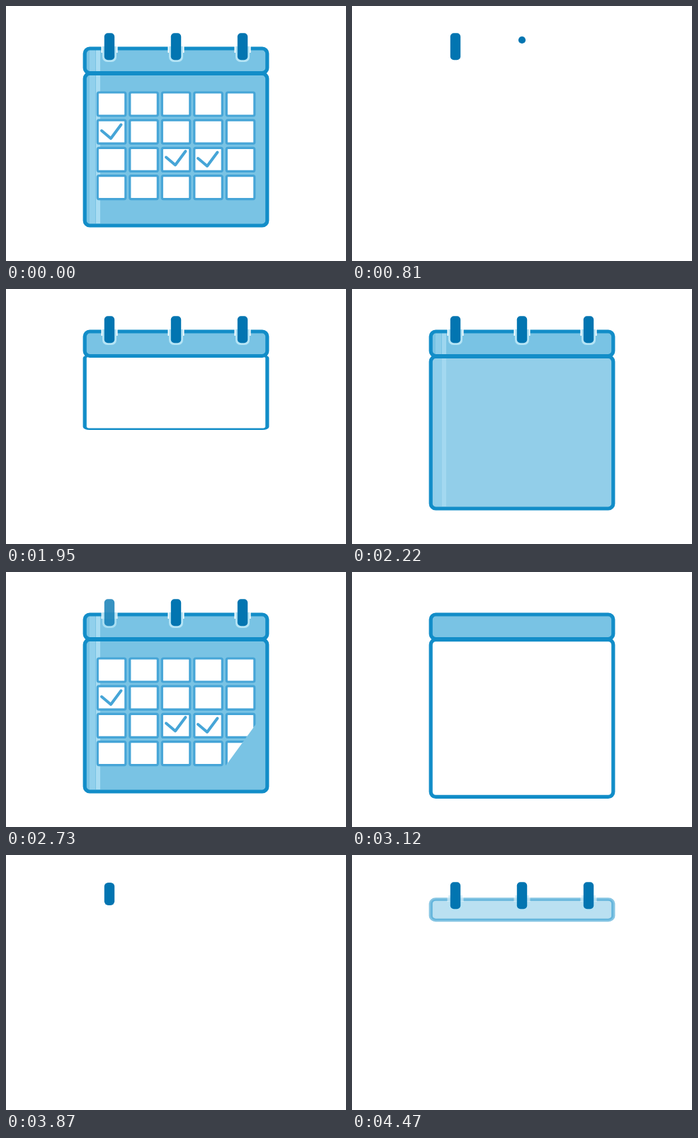
Recreate the animation shown at these times as an HTML page with a canvas. Size 480 by 360 pixels, loop 4500 ms.

```html
<!DOCTYPE html>
<html lang="en">
<head>
<meta charset="utf-8">
<title>Calendar</title>
<style>
  html, body { margin: 0; width: 100%; height: 100%; overflow: hidden; background: #fff; }
  canvas { display: block; width: 480px; height: 360px; }
</style>
</head>
<body>
<canvas width="480" height="360"></canvas>
<script>
const ctx = document.querySelector('canvas').getContext('2d');
const LOOP = 4500, INTRO = 450, REPEAT = 3630, COMPLETE = 2650;
const EDGE = '#128dc8', FILL = '#79c3e4', PIN = '#0275b1', HALO = '#b5e4f5', LINE = '#46a5d7';
const PIN_X = [146, 240, 334];
const CHECKS = [[148, 187], [239, 224.5], [284, 226]];

const ramp = (t, start, end) => Math.min(1, Math.max(0, (t - start) / (end - start)));
const smooth = u => u * u * (3 - 2 * u);

// Grows to `over` at `peak`, then settles back to 1 at `end`.
function pop(t, start, peak, end, over, power) {
  return t < peak
    ? over * ramp(t, start, peak) ** power
    : over + (1 - over) * smooth(ramp(t, peak, end));
}

function layer(alpha, draw) {
  if (alpha <= 0) return;
  ctx.save();
  ctx.globalAlpha *= alpha;
  draw();
  ctx.restore();
}

function box(x, y, w, h, r, fill, stroke, width) {
  ctx.beginPath();
  ctx.roundRect(x, y, w, h, r);
  if (fill) {
    ctx.fillStyle = fill;
    ctx.fill();
  }
  if (stroke) {
    ctx.strokeStyle = stroke;
    ctx.lineWidth = width;
    ctx.stroke();
  }
}

function scaleY(k, origin) {
  ctx.translate(0, origin);
  ctx.scale(1, k);
  ctx.translate(0, -origin);
}

function shine(y, h) {
  box(118, y, 8, h, 0, '#91d0ec');
  box(127, y, 6, h, 0, '#a8dcf2');
}

// Keeps the part of the grid on the upper left of a slanted edge.
function clipDiagonal(amount) {
  const reach = 271 * amount;
  ctx.translate(128, 120);
  ctx.rotate(Math.atan2(40, 55));
  ctx.beginPath();
  ctx.rect(-400, -400, 400 + reach, 800);
  ctx.clip();
  ctx.setTransform(1, 0, 0, 1, 0, 0);
}

function drawCheck([x, y], amount) {
  if (amount <= 0) return;
  ctx.beginPath();
  ctx.moveTo(x - 13, y - 11);
  const first = Math.min(1, amount / 0.4), second = ramp(amount, 0.4, 1);
  ctx.lineTo(x - 13 + 13 * first, y - 11 + 11 * first);
  if (second) ctx.lineTo(x + 14.5 * second, y - 19.5 * second);
  ctx.strokeStyle = LINE;
  ctx.lineWidth = 4;
  ctx.lineCap = ctx.lineJoin = 'round';
  ctx.stroke();
}

function drawGrid(t) {
  clipDiagonal(smooth(ramp(t, 2250, 2490)) * (1 - ramp(t, 2694, 2994)));
  for (let row = 0; row < 4; row++)
    for (let col = 0; col < 5; col++)
      box(129.3 + 45.5 * col, 122 + 39.2 * row, 39.5, 33, 2, '#fff', LINE, 3.2);
  CHECKS.forEach((check, i) => drawCheck(check, ramp(t, 2460 + 55 * i, 2530 + 55 * i)));
}

function drawPage(t, filled) {
  const grow = pop(t, 1700, 2040, 2130, 1.2, 3);
  const shrink = t < 3180
    ? 1 + 0.2 * smooth(ramp(t, 3100, 3180))
    : 1.2 * (1 - ramp(t, 3180, 3315) ** 2);
  const size = grow * shrink;
  if (size <= 0) return;
  layer(1, () => {
    scaleY(size, 93);
    layer(filled, () => {
      box(111.2, 95.5, 257.6, 214.5, 7, FILL);
      shine(98, 209);
    });
    box(111.2, 95.5, 257.6, 214.5, 7, null, EDGE, 5.2);
  });
  layer(1, () => drawGrid(t));
}

function drawHeader(t, filled) {
  layer(ramp(t, 1230, 1350) * (1 - ramp(t, 3360, 3480)), () => {
    scaleY(pop(t, 1190, 1350, 1480, 1.35, 1) * (1 - 0.3 * ramp(t, 3360, 3480)), 77);
    box(111.2, 60, 257.6, 34.5, 7, FILL);
    layer(filled, () => shine(62, 30));
    box(111.2, 60, 257.6, 34.5, 7, null, EDGE, 5.2);
  });
}

function drawPin(t, x, i) {
  const start = 510 + 255 * i, leave = 2700 + 120 * i;
  layer(1 - ramp(t, leave, leave + 150), () => {
    layer(ramp(t, 1230, 1350), () => {
      box(x - 11.5, 56, 23, 10, 0, '#fff');
      box(x - 10, 57, 20, 22, [0, 0, 7, 7], HALO);
    });
    const width = 14.4 * ramp(t, start, start + 65);
    if (!width) return;
    const stretch = smooth(ramp(t, start + 60, start + 240));
    const top = 48 - width / 2 + (38.3 - 40.8) * stretch;
    box(x - width / 2, top, width, width + 23.5 * stretch, width / 2 - 2.2 * stretch, PIN);
  });
}

function draw(now) {
  const clock = now % LOOP;
  const t = clock < INTRO ? COMPLETE : clock < REPEAT ? clock : clock - REPEAT + INTRO;
  const filled = ramp(t, 2100, 2250) * (1 - ramp(t, 2970, 3120));
  ctx.fillStyle = '#fff';
  ctx.fillRect(0, 0, 480, 360);
  drawPage(t, filled);
  drawHeader(t, filled);
  PIN_X.forEach((x, i) => drawPin(t, x, i));
}

const begin = performance.now();
function tick() {
  draw(performance.now() - begin);
  requestAnimationFrame(tick);
}
tick();
</script>
</body>
</html>
```
